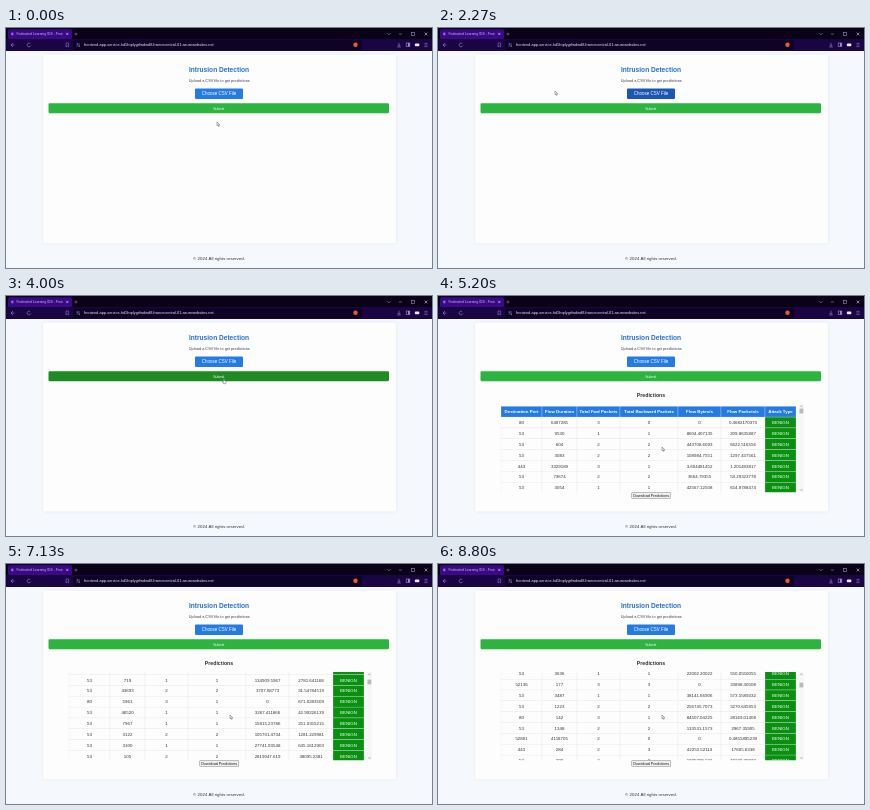
An HTML page with a canvas that plays this animation: 426x240 px, repeating every 8.87 s.

```html
<!DOCTYPE html>
<html lang="en">
<head>
<meta charset="utf-8">
<title>Intrusion Detection</title>
<style>
html, body { margin: 0; width: 100%; height: 100%; overflow: hidden; background: #fff; }
canvas { display: block; width: 100vw; height: 100vh; }
</style>
</head>
<body>
<canvas id="stage"></canvas>
<script>
const W = 426, H = 240, LOOP = 8870, STEP = 1000 / 15;
const FONT = '"Liberation Sans", Arial, sans-serif';
const canvas = document.getElementById('stage');
const ctx = canvas.getContext('2d');

const BLUE = '#247be2', GREEN = '#2bb53f', INK = '#a08cc8';
const CHOOSE = { x: 189, y: 60.5, w: 48, h: 10.5 };
const SUBMIT = { x: 42.5, y: 75.3, w: 340.5, h: 9.9 };

const VIEW = { x: 62.5, y: 108, w: 304, h: 88.3 };
const ROW_H = 10.85, HEAD_Y = 110.25;
const COLUMNS = [
  { title: 'Destination Port', w: 41 },
  { title: 'Flow Duration', w: 35 },
  { title: 'Total Fwd Packets', w: 43 },
  { title: 'Total Backward Packets', w: 58 },
  { title: 'Flow Bytes/s', w: 43 },
  { title: 'Flow Packets/s', w: 44 },
  { title: 'Attack Type', w: 31 }
];
const TABLE_AT = 4600, SCROLL_AT = 5440, SCROLL_SPEED = 0.16;

// Places where the pointer rests, with arrival and departure times
const STOPS = [
  { x: 211, y: 94, from: 0, to: 270 },
  { x: 216.5, y: 66.7, from: 800, to: 1200 },
  { x: 117, y: 63, from: 2000, to: 2420 },
  { x: 217.5, y: 82.7, from: 3700, to: 4350 },
  { x: 224, y: 151, from: 5000, to: LOOP }
];

const ARROW = new Path2D('M0 0V3.8L.9 3L1.6 4.4L2.2 4.1L1.6 2.8H2.7Z');
const HAND = new Path2D('M0 0H.8V1.8L2.6 2.2V4L2 5H0L-1.2 3H0Z');

function noise(n) {
  const v = Math.sin(n * 12.9898 + 4.137) * 43758.5453;
  return v - Math.floor(v);
}

// One flow record; the rates follow from its duration and packet counts
function rowData(i) {
  const random = k => noise(i * 7 + k);
  const kind = random(0);
  const dns = kind < 0.6;
  const port = dns ? 53 : kind < 0.75 ? 80 : kind < 0.88 ? 443 : 32768 + Math.floor(random(1) * 28000);
  const time = Math.floor(10 ** (2 + random(2) * (dns ? 3 : 5.7)));
  const forward = 1 + Math.floor(random(3) * (dns ? 2 : 3));
  const backward = dns ? forward : Math.floor(random(4) * 4);
  const bytes = dns ? forward * (80 + Math.floor(random(5) * 90)) : Math.floor(random(5) * 2) * 12;
  const rate = n => String(Number((n * 1e6 / time).toPrecision(10)));
  return [port, time, forward, backward, rate(bytes), rate(forward + backward), 'BENIGN'];
}

function rect(x, y, w, h, fill, r = 0) {
  ctx.fillStyle = fill;
  ctx.beginPath();
  ctx.roundRect(x, y, w, h, r);
  ctx.fill();
}

function line(points, color, width = 0.6) {
  ctx.strokeStyle = color;
  ctx.lineWidth = width;
  ctx.beginPath();
  points.forEach(([x, y]) => ctx.lineTo(x, y));
  ctx.stroke();
}

function label(text, x, y, size, color, bold = false, align = 'center') {
  ctx.font = `${bold ? 'bold ' : ''}${size}px ${FONT}`;
  ctx.textAlign = align;
  ctx.fillStyle = color;
  ctx.fillText(text, x, y + size * 0.36);
}

function dot(x, y, r, fill) {
  ctx.fillStyle = fill;
  ctx.beginPath();
  ctx.arc(x, y, r, 0, Math.PI * 2);
  ctx.fill();
}

function cross(x, y, r, color) {
  line([[x - r, y - r], [x + r, y + r]], color);
  line([[x + r, y - r], [x - r, y + r]], color);
}

function chevron(x, y, r, color) {
  line([[x - r, y - r / 2], [x, y + r / 2], [x + r, y - r / 2]], color);
}

function drawBrowser() {
  rect(0, 0, W, 11.5, '#0a0216');
  rect(2, 1.2, 64, 10.3, '#3a0a86', 1.5);
  rect(0, 11, W, 12, '#1a0544');
  rect(67, 12.2, 289, 9.6, '#0d0324', 2);

  dot(6.3, 6, 1.4, '#8d62cf');
  label('Federated Learning IDS - Fron', 10.5, 6, 3.4, '#cdbbe9', false, 'left');
  cross(61.3, 5.9, 1.1, '#d8cdec');
  line([[68.5, 6], [71.5, 6]], INK, 0.5);
  line([[70, 4.5], [70, 7.5]], INK, 0.5);

  chevron(383, 6, 1.6, INK);
  line([[392.8, 6], [395.8, 6]], INK);
  ctx.strokeRect(405.6, 4.6, 2.8, 2.8);
  cross(420, 6, 1.4, '#d8cdec');

  line([[7, 15], [5, 17], [7, 19]], INK);
  line([[5, 17], [8.5, 17]], INK);
  ctx.beginPath();
  ctx.arc(23, 17, 1.8, 0.3, 5.4);
  ctx.stroke();
  line([[60, 15], [62.6, 15], [62.6, 19], [61.3, 17.8], [60, 19], [60, 15]], INK, 0.5);
  for (const y of [16, 18]) {
    line([[70.5, y], [74, y]], INK, 0.5);
    dot(y - 16 + 71.5, y, 0.6, INK);
  }
  label('frontend-app-service-hd5hqdygrfwdwd8.francecentral-01.azurewebsites.net',
    78, 16.8, 3.88, '#eee8f8', false, 'left');
  dot(349.5, 16.8, 2.2, '#f0592b');

  line([[393, 14.8], [393, 18]], INK);
  chevron(393, 17.6, 1.3, INK);
  line([[391.2, 19], [394.8, 19]], INK);
  ctx.strokeRect(400.2, 15, 3.6, 3.6);
  rect(402, 15, 1.8, 3.6, INK);
  rect(408.8, 15.5, 4.6, 2.7, '#eee8f8', 1);
  for (const y of [15.4, 17, 18.6]) line([[418.4, y], [421.6, y]], INK, 0.5);
}

function drawButton(b, text, size, fill) {
  rect(b.x, b.y, b.w, b.h, fill, 1.1);
  label(text, b.x + b.w / 2, b.y + b.h / 2, size, '#fff');
}

function drawPage(hoverChoose, hoverSubmit) {
  rect(0, 23, W, H - 23, '#f5f8fd');
  ctx.save();
  ctx.shadowColor = 'rgba(60, 60, 90, 0.1)';
  ctx.shadowBlur = 3 * canvas.width / W;
  rect(37, 26.5, 353, 189, '#fdfdfe', 2);
  ctx.restore();
  label('Intrusion Detection', 213, 42, 6.6, '#2870c8', true);
  label('Upload a CSV file to get predictions', 213.3, 52.2, 3.87, '#404040');
  drawButton(CHOOSE, 'Choose CSV File', 4.5, hoverChoose ? '#1c56b3' : BLUE);
  drawButton(SUBMIT, 'Submit', 3.6, hoverSubmit ? '#1e8c22' : GREEN);
  label('© 2024 All rights reserved.', 213, 230.2, 4.4, '#333');
}

function drawRow(cells, y, head) {
  let x = 63;
  COLUMNS.forEach(({ w }, c) => {
    const attack = c === COLUMNS.length - 1;
    rect(x, y, w, ROW_H, head ? BLUE : attack ? '#0a9010' : '#fdfdfe');
    ctx.strokeStyle = '#e0e0e4';
    ctx.lineWidth = 0.3;
    ctx.strokeRect(x, y, w, ROW_H);
    label(cells[c], x + w / 2, y + ROW_H / 2, 4.4, head || attack ? '#fff' : '#303030', head);
    x += w;
  });
}

function drawTable(scroll) {
  label('Predictions', 213, 99, 5.2, '#333', true);

  ctx.save();
  ctx.beginPath();
  ctx.rect(VIEW.x, VIEW.y, VIEW.w, VIEW.h);
  ctx.clip();
  const top = HEAD_Y - scroll;
  drawRow(COLUMNS.map(c => c.title), top, true);
  const first = Math.max(1, Math.floor((VIEW.y - top) / ROW_H));
  for (let i = first; i < first + 10; i++) drawRow(rowData(i), top + i * ROW_H, false);
  ctx.restore();

  rect(360.8, VIEW.y, 5.2, VIEW.h, '#f6f6f7');
  rect(361.5, 112.6 + scroll * 0.0112, 3.8, 4.8, '#b9b9bd');
  chevron(363.4, 110.3, -1.1, '#707070');
  chevron(363.4, 194, 1.1, '#707070');

  rect(193.5, 196.6, 39.5, 5.8, '#7c7c7c', 0.7);
  rect(193.9, 197, 38.7, 5, '#f0f0ee', 0.5);
  label('Download Predictions', 213.2, 199.5, 3.7, '#111');
}

function pointerAt(t) {
  const next = STOPS.findIndex(s => t <= s.to);
  const b = STOPS[next];
  if (t >= b.from) return b;
  const a = STOPS[next - 1];
  const k = (t - a.to) / (b.from - a.to);
  return { x: a.x + (b.x - a.x) * k, y: a.y + (b.y - a.y) * k };
}

function drawPointer({ x, y }, shape) {
  ctx.save();
  ctx.translate(x, y);
  ctx.fillStyle = '#fff';
  ctx.strokeStyle = '#50506c';
  ctx.lineWidth = 0.5;
  ctx.fill(shape);
  ctx.stroke(shape);
  ctx.restore();
}

const inside = (b, p) => p.x >= b.x && p.x <= b.x + b.w && p.y >= b.y && p.y <= b.y + b.h;

function draw(t) {
  const pointer = pointerAt(t);
  const onChoose = inside(CHOOSE, pointer);
  const onSubmit = inside(SUBMIT, pointer);
  // The button keeps its hover colour while a file is picked
  const picking = t > 1200 && t < 2440;
  drawPage(onChoose || picking, onSubmit);
  if (t >= TABLE_AT) drawTable(Math.max(0, t - SCROLL_AT) * SCROLL_SPEED);
  drawBrowser();
  drawPointer(pointer, onChoose || onSubmit ? HAND : ARROW);
}

function resize() {
  const ratio = window.devicePixelRatio || 1;
  canvas.width = Math.round(innerWidth * ratio);
  canvas.height = Math.round(innerHeight * ratio);
}

const start = performance.now();
function frame() {
  const t = (performance.now() - start) % LOOP;
  ctx.setTransform(canvas.width / W, 0, 0, canvas.height / H, 0, 0);
  draw(Math.floor((t + 4) / STEP) * STEP);
  requestAnimationFrame(frame);
}

addEventListener('resize', resize);
resize();
frame();
</script>
</body>
</html>
```
